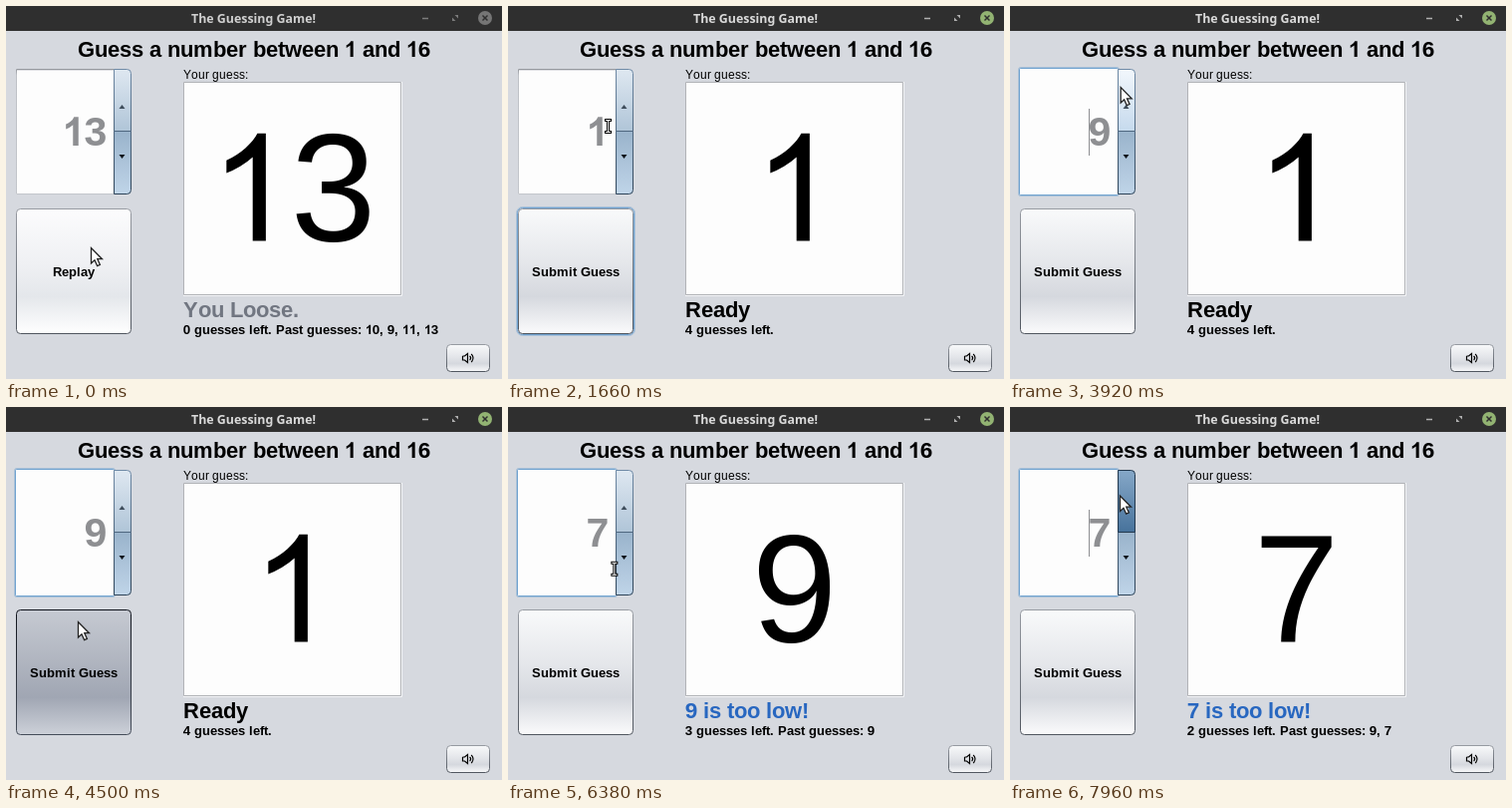
Recreate the animation shown at these times as an HTML page with a canvas. Size 498 by 374 pixels, loop 8000 ms.

```html
<!DOCTYPE html>
<html lang="en">
<head>
<meta charset="utf-8">
<title>The Guessing Game!</title>
<style>
html, body { margin: 0; width: 100%; height: 100%; overflow: hidden; background: #d6d9df; }
canvas { display: block; }
</style>
</head>
<body>
<canvas id="stage" width="498" height="374"></canvas>
<script>
const ctx = document.getElementById('stage').getContext('2d');
const LOOP = 8000, TRIES = 4;
const CLICK = 120, FOCUS_LAG = 40;
const REPEAT = { delay: 420, every: 75, most: 5 };
const GREY = '#8e8f92', BLUE = '#2867c0', RING = '#71a3d0';

// What the player does: pointer moves and mouse presses.
const home = { x: 85, y: 242 };
const moves = [
  { from: 1420, to: 1660, x: 100.5, y: 120.5 },
  { from: 1760, to: 1960, x: 111, y: 80 },
  { from: 3900, to: 4300, x: 72, y: 215 },
  { from: 5040, to: 5480, x: 109, y: 156 },
  { from: 6300, to: 6820, x: 76, y: 252 },
  { from: 6980, to: 7140, x: 107, y: 84 },
  { from: 7420, to: 7620, x: 110, y: 88.5 }
];
const press = (start, on, hold = CLICK) => ({ start, on, end: start + hold });
const presses = [
  press(960, 'submit', 200), press(2300, 'up', 880), press(3480, 'up'), press(3760, 'up'),
  press(4500, 'submit'), press(5880, 'down'), press(6160, 'down'), press(6840, 'submit'), press(7900, 'up')
];

function pointer(t) {
  let { x, y } = home;
  for (const m of moves) {
    const u = Math.min(1, Math.max(0, (t - m.from) / (m.to - m.from))), k = u * u * (3 - 2 * u);
    x += (m.x - x) * k;
    y += (m.y - y) * k;
  }
  return { x, y };
}

function target({ x, y }) {
  if (x >= 10 && x < 126) {
    if (y >= 203 && y < 329) return 'submit';
    if (y >= 63 && y < 189) return x < 108 ? 'field' : y < 126 ? 'up' : 'down';
  }
  return '';
}

// Replays all presses up to time t.
function game(t) {
  let value = 13, past = [10, 9, 11, 13], focus = '';
  for (const { start, end, on } of presses.filter(p => p.start <= t)) {
    const released = t >= end;
    if (t >= start + FOCUS_LAG) focus = on === 'submit' ? on : 'spinner';
    if (on !== 'submit') {
      const held = Math.min(t, end) - start - REPEAT.delay;
      const repeats = Math.min(REPEAT.most, Math.max(0, Math.floor(held / REPEAT.every) + 1));
      value += (repeats + released) * (on === 'up' ? 1 : -1);
    } else if (released) {
      if (past.length === TRIES) [value, past] = [1, []];
      else past.push(value);
    }
  }
  return { value, past, focus };
}

// The digit one has no foot, unlike the installed face.
const ones = {
  normal: new Path2D('M763 0H583V1147Q518 1085 412 1023T223 930V1104Q374 1175 487 1276T647 1472H763Z'),
  bold: new Path2D('M806 0H525V1059Q371 915 162 846V1101Q272 1137 401 1237T578 1472H806Z')
};

// Text on whole-pixel advances; align is 0 left, .5 centre, 1 right. Digits are a little taller.
function text(str, x, y, size, color, align = 0, weight = 'bold') {
  const face = s => `${weight} ${s}px "Liberation Sans", Arial, sans-serif`;
  ctx.fillStyle = color;
  ctx.textAlign = 'left';
  ctx.font = face(size);
  const steps = [...str].map(c => Math.round(ctx.measureText(c).width));
  x = Math.round(x - align * steps.reduce((a, b) => a + b, 0));
  [...str].forEach((c, i) => {
    const digit = /\d/.test(c);
    if (c === '1') {
      ctx.save();
      ctx.translate(x, y);
      ctx.scale(size / 2048, -size / 2048);
      ctx.fill(ones[weight]);
      ctx.restore();
    } else {
      ctx.font = face(digit ? size * 1.027 : size);
      ctx.fillText(c, digit ? x - size * .015 : x, y);
    }
    x += steps[i];
  });
}

function gradient(y, h, stops) {
  const g = ctx.createLinearGradient(0, y, 0, y + h);
  stops.forEach(([p, c]) => g.addColorStop(p, c));
  return g;
}

function rounded(x, y, w, h, r, fill, stroke) {
  ctx.beginPath();
  ctx.roundRect(x, y, w, h, r);
  if (fill) { ctx.fillStyle = fill; ctx.fill(); }
  if (stroke) { ctx.strokeStyle = stroke; ctx.lineWidth = 1; ctx.stroke(); }
}

function ring(x, y, w, h, r) {
  rounded(x - 1.5, y - 1.5, w + 3, h + 3, r + 1, null, RING + '70');
  rounded(x - .5, y - .5, w + 1, h + 1, r, null, RING);
}

function line(color, width, ...pts) {
  ctx.beginPath();
  pts.forEach(p => ctx.lineTo(...p));
  ctx.strokeStyle = color;
  ctx.lineWidth = width;
  ctx.stroke();
}

function shape(color, ...pts) {
  ctx.beginPath();
  pts.forEach(p => ctx.lineTo(...p));
  ctx.closePath();
  ctx.fillStyle = color;
  ctx.fill();
}

const faces = {
  normal: ['#f9fafb', '#e4e6ea', '#d5d8de', '#fbfbfc'],
  hover: ['#fcfcfd', '#eff0f3', '#e4e7eb', '#ffffff'],
  pressed: ['#c6cad2', '#aeb3be', '#a0a6b3', '#cdd1d9']
};

function button(x, y, w, h, state, focused) {
  const [a, b, c, d] = faces[state];
  const edge = state === 'pressed' ? ['#10141c', '#454d5a'] : ['#979ba2', '#50565f'];
  if (focused) ring(x, y, w, h, 5);
  rounded(x + .5, y + .5, w - 1, h - 1, 4,
    gradient(y, h, [[0, a], [.45, b], [.7, c], [1, d]]), gradient(y, h, [[0, edge[0]], [1, edge[1]]]));
}

function titleBar(active) {
  ctx.fillStyle = '#2f2f2f';
  ctx.fillRect(0, 0, 498, 25);
  ctx.font = '600 12.4px "Noto Sans", sans-serif';
  ctx.textAlign = 'center';
  ctx.fillStyle = active ? '#dadada' : '#d0d0d0';
  ctx.fillText('The Guessing Game!', 248.5, 17);
  const icon = active ? '#b0b0b0' : '#7c7c7c';
  line(icon, 1.5, [418, 12.5], [424, 12.5]);
  shape(icon, [450.5, 9], [454, 9], [454, 12.5]);
  shape(icon, [448, 11.5], [448, 15], [451.5, 15]);
  ctx.beginPath();
  ctx.arc(481, 12, 7, 0, 7);
  ctx.fillStyle = active ? '#92b372' : '#757575';
  ctx.fill();
  line('#2f2f2f', 1.5, [478.5, 9.5], [483.5, 14.5]);
  line('#2f2f2f', 1.5, [483.5, 9.5], [478.5, 14.5]);
}

const arrowFaces = {
  up: { normal: ['#dfe8f1', '#b0c5d8'], hover: ['#f2f7fc', '#c6daed'], pressed: ['#86a8c8', '#48739c'] },
  down: { normal: ['#99b3cb', '#bfd4e8'], hover: ['#b6d0e7', '#dcedfb'], pressed: ['#48739c', '#7fa3c5'] }
};

function arrow(kind, y, h, corners, tip, dir, state) {
  const [top, bottom] = arrowFaces[kind][state], pressed = state === 'pressed';
  rounded(108.5, y + .5, 17, h, corners, gradient(y, h, [[0, top], [1, bottom]]),
    pressed ? '#22384e' : gradient(63, 126, [[0, '#6f8aa6'], [1, '#2c4257']]));
  shape(pressed ? '#fff' : kind === 'up' ? '#3e4d5b' : '#10161c',
    [116.5, tip], [119.5, tip + 4 * dir], [113.5, tip + 4 * dir]);
}

function spinner(value, focused, caret, state) {
  if (focused) ring(10, 63, 98, 126, 1);
  ctx.fillStyle = '#fdfdfd';
  ctx.fillRect(10, 63, 98, 126);
  if (!focused) {
    ctx.fillStyle = '#dedfe2';
    ctx.fillRect(10, 64, 98, 1);
    rounded(10.5, 63.5, 98, 125, 0, null, gradient(63, 126, [[0, '#92959b'], [.05, '#bec1c6'], [1, '#c3c6cb']]));
  }
  text(String(value), 101, 140, 40, GREY, 1);
  if (caret) {
    ctx.fillStyle = GREY;
    ctx.fillRect(79, 103, 1, 47);
  }
  arrow('down', 125, 63, [0, 0, 4, 0], 153, -1, state('down'));
  arrow('up', 63, 62, [0, 4, 0, 0], 99, 1, state('up'));
}

function speaker() {
  button(442, 339, 44, 28, 'normal');
  line('#000', 1.2, [458.5, 351], [460.5, 351], [463.5, 348.5], [463.5, 357.5],
    [460.5, 355], [458.5, 355], [458.5, 351]);
  for (const r of [2.5, 5]) {
    ctx.beginPath();
    ctx.arc(464, 353, r, -.9, .9);
    ctx.stroke();
  }
}

function cursor({ x, y }, beam) {
  ctx.save();
  ctx.translate(x, y);
  if (beam) {
    for (const [color, w] of [['#000', 3], ['#fff', 1]]) {
      const e = 2 + w / 2;
      for (const end of [-6, 6]) line(color, w, [-e, end], [e, end]);
      line(color, w, [0, -6], [0, 6]);
    }
  } else {
    const outline = [[.5, .5], [.5, 16], [4, 12.8], [6.6, 18.6], [9.4, 17.4], [6.8, 11.7], [11.5, 11.7], [.5, .5], [.5, 3]];
    shape('#fff', ...outline);
    line('#222', 1.3, ...outline);
  }
  ctx.restore();
}

function draw(t) {
  const { value, past, focus } = game(t);
  const spot = pointer(t), over = target(spot);
  const down = presses.some(p => t >= p.start && t < p.end);
  const state = name => name !== over ? 'normal' : down ? 'pressed' : 'hover';
  const ended = past.length === TRIES, last = past[past.length - 1];

  ctx.fillStyle = '#d6d9df';
  ctx.fillRect(0, 0, 498, 374);
  titleBar(t >= presses[0].start);
  text('Guess a number between 1 and 16', 249, 51, 22, '#000', .5);
  text('Your guess:', 178, 73, 12, '#000', 0, 'normal');

  rounded(178.5, 76.5, 218, 213, 0, '#fdfdfd', '#b1b3b7');
  line('#f4f5f7', 1, [178, 290.5], [397.5, 290.5], [397.5, 76]);
  text(String(last ?? 1), 288, 235.6, 150, '#000', .5, 'normal');
  if (ended) text('You Loose.', 178, 312, 22, '#717681');
  else if (last) text(`${last} is too low!`, 178, 312, 22, BLUE);
  else text('Ready', 178, 312, 22, '#000');
  const history = last ? ` Past guesses: ${past.join(', ')}` : '';
  text(`${TRIES - past.length} guesses left.${history}`, 178, 329, 13, '#000');

  const caret = focus === 'spinner' && (over === 'up' || over === 'down');
  spinner(value, focus === 'spinner', caret, state);
  button(10, 203, 116, 126, state('submit'), focus === 'submit');
  text(ended ? 'Replay' : 'Submit Guess', 68, 271, 13, '#000', .5);
  speaker();
  cursor(spot, over === 'field');
}

function tick() {
  draw(performance.now() % LOOP);
  requestAnimationFrame(tick);
}
tick();
</script>
</body>
</html>
```
